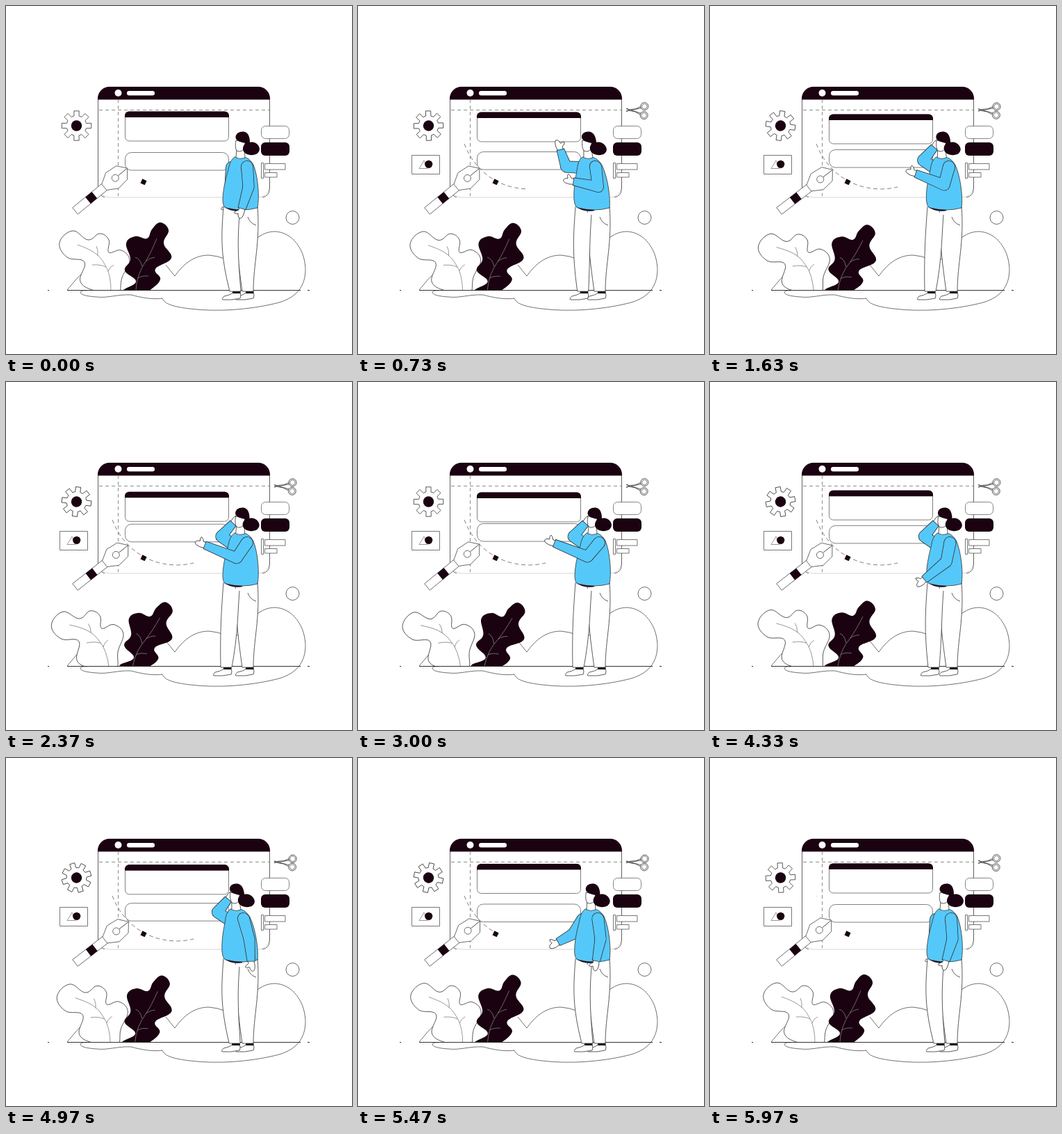
Recreate the animation shown at these times as an HTML page with a canvas. Size 498 by 500 pixels, loop 6.01 s.

```html
<!DOCTYPE html>
<html lang="en">
<head>
<meta charset="utf-8">
<title>Page design</title>
<style>
html, body { margin: 0; width: 100%; height: 100%; overflow: hidden; background: #fff; }
canvas { display: block; }
</style>
</head>
<body>
<canvas id="stage" width="498" height="500"></canvas>
<script>
const ctx = document.getElementById('stage').getContext('2d');
const LOOP = 6010, TAU = Math.PI * 2, DEG = Math.PI / 180;
const DARK = '#1a0210', BLUE = '#55c8fa', LINE = '#333', GREY = '#808080', WHITE = '#fff';

const mix = (a, b, u) => a + (b - a) * u;

// Smooth step from 0 to 1 between two times
function ease(t, from, to) {
  const u = Math.min(1, Math.max(0, (t - from) / (to - from)));
  return u * u * (3 - 2 * u);
}

// Rises over the first pair of times, falls over the second
const pulse = (t, a, b, c, d) => ease(t, a, b) - ease(t, c, d);

function paint(path, fill, stroke = LINE, width = 0.8) {
  if (fill) { ctx.fillStyle = fill; ctx.fill(path); }
  if (stroke) { ctx.strokeStyle = stroke; ctx.lineWidth = width; ctx.stroke(path); }
}
const shape = (d, fill, stroke, width) => paint(new Path2D(d), fill, stroke, width);

function box(x, y, w, h, r, fill, stroke, width) {
  const p = new Path2D();
  p.roundRect(x, y, w, h, r);
  paint(p, fill, stroke, width);
}

function disc(x, y, r, fill, stroke, width) {
  const p = new Path2D();
  p.arc(x, y, r, 0, TAU);
  paint(p, fill, stroke, width);
}

function at(x, y, angle, draw) {
  ctx.save();
  ctx.translate(x, y);
  ctx.rotate(angle * DEG);
  draw();
  ctx.restore();
}

function dashed(dash, draw) {
  ctx.setLineDash(dash);
  draw();
  ctx.setLineDash([]);
}

// Closed smooth curve through points given as "x,y x,y ..."
function blob(text) {
  const pts = text.split(' ').map(s => s.split(',').map(Number));
  const n = pts.length, get = i => pts[(i + n) % n];
  const path = new Path2D();
  path.moveTo(...pts[0]);
  for (let i = 0; i < n; i++) {
    const [a, b, c, d] = [get(i - 1), get(i), get(i + 1), get(i + 2)];
    const k = 5;
    path.bezierCurveTo(b[0] + (c[0] - a[0]) / k, b[1] + (c[1] - a[1]) / k,
      c[0] - (d[0] - b[0]) / k, c[1] - (d[1] - b[1]) / k, ...c);
  }
  return path;
}

// Lobe tips and the notches between them
const paleLeaf = blob('77,340 88,361 113,368 107,396 130,410 160,416 167,390 178,366 166,351 148,354 148,336 135,327 118,336 96,323');
const darkLeaf = blob('210,321 222,311 234,322 227,341 238,362 215,378 222,393 206,409 188,418 168,410 187,396 171,380 179,364 173,341 186,331 203,334');

function leaves(swing) {
  ctx.save();
  ctx.beginPath();
  ctx.rect(0, 0, 498, 408.5);
  ctx.clip();
  at(130 - 3.5 * swing, 408 + 2 * swing, -8.5 * swing, () => {
    ctx.translate(-130, -408);
    paint(paleLeaf, WHITE);
    shape('M103 343C122 350 134 356 142 371Q152 386 151 414M130 345Q133 351 132 359M124 372Q136 371 144 375M155 372Q149 375 147 381', null, GREY);
  });
  at(185 - 5 * swing, 408, 8 * swing, () => {
    ctx.translate(-185, -408);
    paint(darkLeaf, DARK, null);
    shape('M217 334Q209 354 201 367Q188 386 187 408M186 361Q193 363 196 374M214 361Q206 362 201 367M205 388Q196 387 190 391', null, GREY);
  });
  ctx.restore();
}

function ground() {
  shape('M88 408Q101 391 118 376M230 372L243 388C253 374 268 358 292 358Q305 359 314 363L343 364C347 342 366 324 387 324C413 325 431 351 431 380C430 408 413 422 385 428C350 436 305 440 265 435C240 432 228 428 225 420C210 422 195 419 180 415C160 414 147 420 130 418C116 417 107 415 107 411Q109 408 116 409', null, LINE, 0.7);
}

function limb(x, y, angle, length, r1, r2, color) {
  at(x, y, angle, () => {
    shape(`M0 ${-r1}L${length} ${-r2}V${r2}L0 ${r1}Z`, color, null);
    disc(0, 0, r1, color, null);
  });
}

function arm(x, y, upper, a, lower, b) {
  const ex = x + upper * Math.cos(a * DEG), ey = y + upper * Math.sin(a * DEG);
  at(ex, ey, b, () => {
    ctx.translate(lower, 0);
    shape('M-2 -4L5 -5Q12 -5 14 -2Q14 2 8 3Q10 8 8 9Q5 8 3 4L-2 4Z', WHITE);
  });
  for (const [color, inset] of [[LINE, 0], [BLUE, 0.8]]) {
    limb(x, y, a, upper, 9 - inset, 8.5 - inset, color);
    limb(ex, ey, b, lower - inset, 8.5 - inset, 6 - inset, color);
  }
}

function shoe(x, y) {
  at(x, y, 0, () => {
    shape('M16 1Q10 5 3 6Q-1 10 1 11Q14 12 26 9Q28 5 26 1Z', WHITE);
    box(15, -2, 11.5, 4, 1, DARK, null);
  });
}

function legs(toe) {
  shoe(330, 411);
  shoe(toe, 411);
  shape('M330 288C331 340 333 360 340 410H356C356 370 366 340 362 288', WHITE);
  shape(`M313 288C310 330 308 355 ${toe + 11} 410H${toe + 27}C334 360 333 340 336 300`, WHITE);
  shape('M348 303Q351 312 360 315', null);
  shape('M315 288Q325 295 340 293', null, DARK, 2.5);
}

function person(t) {
  const lean = -8 * (pulse(t, 0, 600, 900, 2600) + pulse(t, 4000, 4900, 5100, 5700));
  const think = pulse(t, 0, 1100, 5000, 5700);
  const point = pulse(t, 0, 900, 3700, 4900);
  const stretch = pulse(t, 0, 3000, 3700, 4900);
  const shear = lean / 95;

  // The upper body leans from the hips
  const upperBody = draw => {
    ctx.save();
    ctx.transform(1, 0, -shear, 1, shear * 290, 0);
    draw();
    ctx.restore();
  };

  upperBody(() => arm(325, 232, mix(27, 18, think), mix(94, 214, think), 26, mix(98, 312, think)));
  legs(311 - 13 * pulse(t, 0, 1500, 3700, 5200));
  upperBody(() => {
    shape('M329 217Q322 222 320 235Q312 262 312 278Q312 289 317 290Q340 296 362 290C365 275 363 245 356 228Q351 219 343 217Z', BLUE);
    shape('M332 206L331 218Q337 221 344 218L343 203', WHITE);
    shape('M331 193Q329 203 332 208Q338 211 343 205L346 196Z', WHITE);
    shape('M330.5 189C330.5 182 338 179.5 344 181C350 183 351 191 351 196C358 194 364 199 365 205C365 212 358 215 351 214C345 213 341 210 341 205C341 201 343 200 344 197C339 196 331 194 330.5 189Z', DARK, null);
    arm(347, 231, mix(29, 26, stretch), mix(86 - 7 * think, 130, stretch),
      mix(33, 52, stretch), mix(107 - 17 * think, 202, point));
  });
}

function gear(t) {
  at(101.5, 172, 360 * t / LOOP, () => {
    const p = new Path2D();
    for (let i = 0; i < 8; i++) {
      const a = i * TAU / 8;
      for (const [r, w] of [[14.5, -0.25], [21.5, -0.17], [21.5, 0.17], [14.5, 0.25]])
        p.lineTo(r * Math.cos(a + w), r * Math.sin(a + w));
    }
    p.closePath();
    paint(p, WHITE);
    disc(0, 0, 7.7, DARK, null);
  });
}

function scissors(t) {
  const open = 4 * (1 - Math.cos(TAU * (t + 40) / (LOOP / 8)));
  for (const side of [-1, 1]) {
    at(400, 150, 3 + side * open / 2, () => {
      ctx.scale(1, side);
      shape('M8 -4L-14 2Q-8 -2 -1 -2L7 -6Z', WHITE);
      disc(12, -6.5, 5.5, WHITE);
      disc(12, -6.5, 3.7, null, LINE, 0.6);
    });
  }
}

function picture() {
  box(77.5, 214.5, 40, 27, 0, WHITE, '#555');
  shape('M88 233.5L95 222L100 233.5Z', null, GREY);
  disc(101.7, 227.3, 5.6, DARK, null);
}

function page(swing) {
  box(132.5, 116.5, 247, 158.5, 17, WHITE, '#bbb', 0.6);
  shape('M132.5 134V262Q133 272 142 275M379.5 134V262Q379 273 369 275', null, '#444', 0.8);
  box(132, 116, 248, 18.5, [17, 17, 0, 0], DARK, null);
  disc(161.5, 125, 5, WHITE, null);
  box(174, 122, 40, 6.5, 3.2, WHITE, null);
  dashed([5, 4], () => shape('M134 149.5H379M161.5 134V273', null, GREY, 0.9));

  const y = 152 + 7 * swing;
  box(171.5, y, 149, 42, 6, WHITE, GREY, 1);
  box(171, y - 0.5, 150, 8.5, [6, 6, 0, 0], DARK, null);
  box(171.5, 210.5 - 7 * swing, 149, 25.5, 9, WHITE, GREY, 1);
}

function drawnCurve(t) {
  const end = 146 * pulse(t, 0, 1020, LOOP - 1020, LOOP);
  if (end > 0.5) {
    const dash = [];
    for (let s = 0; s < end; s += 10) dash.push(Math.min(6, end - s), 4);
    dash[dash.length - 1] = 999;
    dashed(dash, () => shape('M153 198C165 230 195 262 245 263Q258 263 270 260', null, GREY, 1));
  }
  at(198, 252.8, 25, () => box(-3.4, -3.4, 6.8, 6.8, 0, DARK, null));
}

function pen(t) {
  const tilt = -Math.cos(TAU * (2 * t / LOOP - 0.1));
  at(99.5, 294.5, -38.5 + tilt, () => {
    box(0, -6, 55, 12, 0, WHITE, '#555');
    box(24, -6, 12, 12, 0, DARK, null);
    shape('M54 -5.5L69 -14.5L87 -12.5L97 0L87 12.5L69 14.5L54 5.5Z', WHITE, '#555');
    shape('M80 0H96', null);
    disc(74.7, 0, 5, WHITE, '#555');
  });
}

function sideIcons() {
  box(367.5, 172.5, 40, 18, 6, WHITE, '#666');
  box(367, 196, 41, 19, 6, DARK, null);
  box(367.5, 225.5, 3, 22, 0, WHITE, '#555');
  box(372.5, 226.5, 29.5, 8.5, 0, WHITE, '#555');
  box(372.5, 239.5, 17.5, 6.5, 0, WHITE, '#555');
  disc(412.5, 304, 9.5, WHITE, '#444');
}

function frame() {
  const t = performance.now() % LOOP;
  const swing = (1 - Math.cos(TAU * t / LOOP)) / 2;
  ctx.fillStyle = WHITE;
  ctx.fillRect(0, 0, 498, 500);

  ground();
  leaves(swing);
  shape('M88 408.5H424M60 408.5H62M434 408.5H437', null, LINE, 1);
  page(swing);
  drawnCurve(t);
  pen(t);
  gear(t);
  sideIcons();
  if (t >= 30) {
    picture();
    scissors(t);
  }
  person(t);
  requestAnimationFrame(frame);
}
requestAnimationFrame(frame);
</script>
</body>
</html>
```
